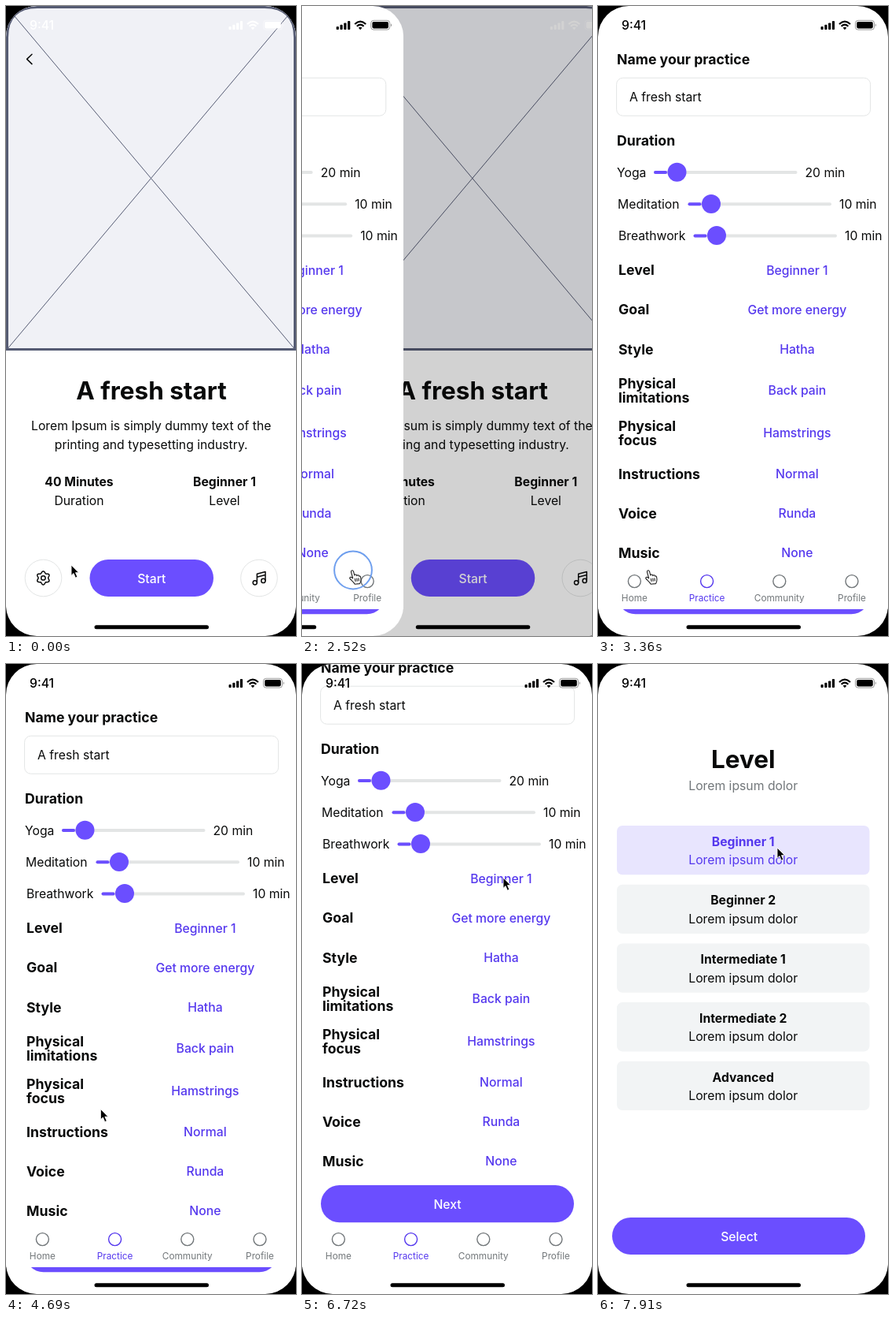
Recreate the animation shown at these times as an HTML page. Size 369 by 799 pixels, loop 8000 ms.

```html
<!DOCTYPE html>
<html lang="en">
<head>
<meta charset="utf-8">
<title>Practice prototype</title>
<style>
html, body { margin: 0; width: 100%; height: 100%; overflow: hidden; background: #000; }
svg { display: block; width: 369px; height: 799px; }
text { font-family: Inter, "Liberation Sans", sans-serif; font-optical-sizing: none; white-space: pre; }
</style>
</head>
<body>
<svg id="stage" viewBox="0 0 369 799"></svg>
<script>
const W = 369, H = 799, LOOP = 8000;
const PURPLE = '#6b4eff', LINK = '#5538ee', INK = '#090a0a', GREY = '#72777a', LINE = '#e3e5e5';
const SMALL = 11.8, BODY = 15.74, HEAD = 17.7, TITLE = 31.5;

// Text placed by the middle of its capitals
function text(s, x, y, { size = BODY, weight = 400, fill = INK, anchor = 'middle' } = {}) {
  return `<text x="${x}" y="${(y + size * 0.364).toFixed(2)}" font-size="${size}" font-weight="${weight}" fill="${fill}" text-anchor="${anchor}">${s}</text>`;
}
const left = (s, x, y, o = {}) => text(s, x, y, { anchor: 'start', ...o });
const rect = (x, y, w, h, r, fill, more = '') =>
  `<rect x="${x}" y="${y}" width="${w}" height="${h}" rx="${r}" fill="${fill}" ${more}/>`;
const circle = (x, y, r, fill, more = '') => `<circle cx="${x}" cy="${y}" r="${r}" fill="${fill}" ${more}/>`;
const path = (d, stroke, width, more = '') =>
  `<path d="${d}" fill="none" stroke="${stroke}" stroke-width="${width}" stroke-linecap="round" stroke-linejoin="round" ${more}/>`;

function statusBar(c) {
  const bars = [4, 6.2, 8.6, 11].map((h, i) => rect(283.5 + i * 4.8, 30 - h, 3.2, h, 0.9, c)).join('');
  const arcs = [[7, 23], [4.4, 25.8]].map(([w, y]) =>
    `<path d="M${314 - w} ${y}Q314 ${y - w * 0.95} ${314 + w} ${y}" fill="none" stroke="${c}" stroke-width="2.2"/>`).join('');
  return left('9:41', 30, 24.3, { weight: 500, fill: c }) + bars + arcs +
    `<path d="M311.6 27.6Q314 25.8 316.4 27.6L314 30.2Z" fill="${c}"/>` +
    rect(327.5, 18.3, 24, 11.8, 3.4, 'none', `stroke="${c}" stroke-opacity=".4"`) +
    rect(329.2, 20, 20.6, 8.4, 1.8, c) +
    `<path d="M352.8 22.2Q355 24.2 352.8 26.2Z" fill="${c}" opacity=".45"/>`;
}

const homeBar = rect(112.5, 785.2, 145.5, 5, 2.5, '#000');

function gear(cx, cy) {
  let d = '';
  for (let i = 0; i < 60; i++) {
    const a = i * Math.PI / 30;
    const r = 7.4 + 1.15 * Math.cos(6 * a);
    d += `${i ? 'L' : 'M'}${(cx + r * Math.sin(a)).toFixed(2)} ${(cy - r * Math.cos(a)).toFixed(2)}`;
  }
  return path(d + 'Z', INK, 1.5) + circle(cx, cy, 2.7, 'none', `stroke="${INK}" stroke-width="1.5"`);
}

function notes(x, y) {
  return path(`M${x - 2.6} ${y + 5.6}V${y - 5.4}L${x + 8} ${y - 8}V${y + 3.2}M${x - 2.6} ${y - 1.4}L${x + 8} ${y - 4}`, INK, 1.5) +
    circle(x - 5.2, y + 5.7, 2.6, 'none', `stroke="${INK}" stroke-width="1.5"`) +
    circle(x + 5.4, y + 3.3, 2.6, 'none', `stroke="${INK}" stroke-width="1.5"`);
}

function introScreen() {
  const edge = '#555b73';
  const ring = x => circle(x, 725.5, 23.3, '#fff', `stroke="${LINE}"`);
  const fact = (x, a, b) => text(a, x, 603, { weight: 700 }) + text(b, x, 627);
  return rect(0, 0, W, 437, 0, '#f0f1f6') +
    path('M0 437L369 0M0 0L369 437', edge, 1) +
    path('M1.5 435.5V40Q1.5 1.5 40 1.5H329Q367.5 1.5 367.5 40V435.5Z', edge, 3) +
    statusBar('#fff') +
    path('M33 61.2L26.6 67.4L33 73.6', INK, 1.5) +
    text('A fresh start', 185, 488, { size: TITLE, weight: 700 }) +
    text('Lorem Ipsum is simply dummy text of the', 184.7, 532.7) +
    text('printing and typesetting industry.', 184.7, 556.3) +
    fact(93, '40 Minutes', 'Duration') + fact(278, 'Beginner 1', 'Level') +
    ring(47.5) + gear(47.4, 725.4) + ring(322) + notes(322, 725.6) +
    rect(106.5, 702, 157.5, 47, 23.5, PURPLE) +
    text('Start', 185.3, 725.8, { weight: 500, fill: '#fff' }) + homeBar;
}

function practiceScreen() {
  const head = (s, x, y) => left(s, x, y, { size: HEAD, weight: 700 });
  const slider = ([name, x, y, from, value]) =>
    left(name, x, y) + rect(from, y - 2, 182.5, 4, 2, LINE) +
    rect(from, y - 2, 17, 4, 2, PURPLE) + circle(from + 29.5, y - 0.3, 12, PURPLE) +
    left(value, from + 192.5, y);
  const sliders = [
    ['Yoga', 24, 211, 71, '20 min'],
    ['Meditation', 25, 251.2, 114.5, '10 min'],
    ['Breathwork', 26, 291.4, 121.5, '10 min']
  ];
  const rows = [
    ['Level', 'Beginner 1', 335], ['Goal', 'Get more energy', 385], ['Style', 'Hatha', 435.3],
    ['Physical|limitations', 'Back pain', 487.3], ['Physical|focus', 'Hamstrings', 541.4],
    ['Instructions', 'Normal', 593.5], ['Voice', 'Runda', 643.5], ['Music', 'None', 693.6]
  ];
  const row = ([name, value, y]) => {
    const lines = name.split('|');
    return lines.map((s, i) => head(s, 26, y + (i - (lines.length - 1) / 2) * 17.7)).join('') +
      text(value, 253.4, y, { weight: 500, fill: LINK });
  };
  const tab = (s, i) => {
    const x = 46.4 + i * 92.2, c = i === 1 ? LINK : GREY;
    return circle(x, 729.6, 8, 'none', `stroke="${c}" stroke-width="1.4"`) +
      text(s, x, 750.8, { size: SMALL, fill: c });
  };
  return '<g id="scroll">' +
    head('Name your practice', 24, 68) +
    rect(23.6, 91.2, 323, 48, 8, '#fff', `stroke="${LINE}"`) +
    left('A fresh start', 40, 115.6) + head('Duration', 24, 171) +
    sliders.map(slider).join('') + rows.map(row).join('') +
    rect(24, 724, 322, 47.2, 23.6, PURPLE) +
    text('Next', 185, 748, { weight: 500, fill: '#fff' }) + '</g>' +
    rect(0, 709, W, 56, 0, '#fff') +
    ['Home', 'Practice', 'Community', 'Profile'].map(tab).join('') +
    statusBar('#000') + homeBar;
}

function levelScreen() {
  const card = (name, i) => {
    const y = 205 + i * 74.7, on = i === 0, c = on ? LINK : INK;
    return rect(24, y, 321.5, 62.3, 7, on ? '#e8e5fe' : '#f2f4f5') +
      text(name, 184.7, y + 20, { weight: 700, fill: c }) +
      text('Lorem ipsum dolor', 184.7, y + 43.5, { fill: c });
  };
  return statusBar('#000') +
    text('Level', 184.7, 121, { size: TITLE, weight: 700 }) +
    text('Lorem ipsum dolor', 184.7, 154.2, { fill: GREY }) +
    ['Beginner 1', 'Beginner 2', 'Intermediate 1', 'Intermediate 2', 'Advanced'].map(card).join('') +
    rect(18, 702, 322, 47, 23.5, PURPLE) +
    text('Select', 179.7, 725.8, { weight: 500, fill: '#fff' }) + homeBar;
}

const screen = (id, body) =>
  `<g id="${id}"><g clip-path="url(#phone)">${rect(0, 0, W, H, 0, '#fff')}${body}` +
  `<rect class="dim" width="${W}" height="${H}" opacity="0"/></g></g>`;

const $ = id => document.getElementById(id);
$('stage').innerHTML =
  `<clipPath id="phone">${rect(0, 0, W, H, 39, '#fff')}</clipPath>` +
  screen('intro', introScreen()) + screen('practice', practiceScreen()) + screen('level', levelScreen()) +
  `<circle id="ring" fill="none" stroke="#6f9fee" stroke-width="2"/>
  <g id="arrow"><path d="M0 0V13.4L3 10.6L5.4 16.2L7.9 15.1L5.5 9.7H9.6Z" stroke="#fff" stroke-width=".9"/></g>
  <g id="hand" stroke="#222" stroke-width="1.1" stroke-linejoin="round" stroke-linecap="round">
    <path fill="#fff" d="M-.8 8L-2.5 2Q-2.8 .1-1.3-.2Q0-.3 .5 1.2L1.8 6Q2.5 4.6 4 5.2Q4.6 5.6 4.8 6.6Q5.6 5.3 7 6Q7.5 6.4 7.6 7.3Q8.8 6.5 9.5 7.8L10 11Q10 14 8.6 16.6L2.2 17.2Q1 15-1.5 12.8L-4.2 10Q-4.5 8.4-3 8.3Q-1.9 8.4-.3 9.9Z"/>
    <path fill="none" d="M2.4 10.4L3 13.6M4.7 10.1L5.2 13.3M6.9 9.8L7.3 12.9"/>
  </g>`;

const clamp = x => Math.min(1, Math.max(0, x));
const easeOut = (t, start, length, power) => 1 - (1 - clamp((t - start) / length)) ** power;
const slide = (t, start) => easeOut(t, start, 760, 2.1);
const move = (id, x, y = 0) => $(id).setAttribute('transform', `translate(${x.toFixed(2)} ${y.toFixed(2)})`);
const show = (id, on) => $(id).setAttribute('visibility', on ? 'visible' : 'hidden');
const dim = (id, p) => document.querySelector(`#${id} .dim`).setAttribute('opacity', p * 0.5);

// time, x, y of the pointer tip
const POINTER = [
  [0, 83, 709], [70, 83, 709], [140, 66, 713], [980, 66, 713], [1540, 65, 716],
  [4130, 65, 716], [4200, 67, 712], [4340, 67, 712], [5110, 190, 372],
  [5390, 190, 372], [5460, 181, 359], [6200, 181, 359], [6720, 256, 271],
  [7630, 256, 271], [7910, 228, 233], [LOOP, 228, 233]
];
const CLICKS = [[2370, 65, 715.5], [6820, 255.5, 271]];

function pointerAt(t) {
  const i = POINTER.findIndex(k => k[0] > t);
  const [t0, x0, y0] = POINTER[i - 1], [t1, x1, y1] = POINTER[i];
  const u = (t - t0) / (t1 - t0), e = u * u * (3 - 2 * u);
  return [x0 + (x1 - x0) * e, y0 + (y1 - y0) * e];
}

function draw(t) {
  const first = slide(t, 2380), second = slide(t, 6790);
  move('intro', first * W / 4);
  dim('intro', first);
  show('intro', first < 1);
  move('practice', (first - 1) * W - second * W / 4);
  dim('practice', second);
  show('practice', first > 0 && second < 1);
  move('scroll', 0, -63 * easeOut(t, 5715, 795, 2));
  move('level', (1 - second) * W);
  show('level', second > 0);

  const click = CLICKS.find(([s]) => t >= s && t < s + 335);
  show('ring', click);
  if (click) {
    const age = t - click[0];
    move('ring', click[1], click[2]);
    $('ring').setAttribute('r', 16.2 + 0.051 * age);
    $('ring').setAttribute('opacity', clamp((335 - age) / 110));
  }

  const [x, y] = pointerAt(t), overLink = t >= 110 && t < 4130;
  move('arrow', x, y);
  move('hand', x, y);
  show('arrow', !overLink);
  show('hand', overLink);
}

const begin = performance.now();
function tick() {
  draw((performance.now() - begin) % LOOP);
  requestAnimationFrame(tick);
}
draw(0);
requestAnimationFrame(tick);
</script>
</body>
</html>
```
